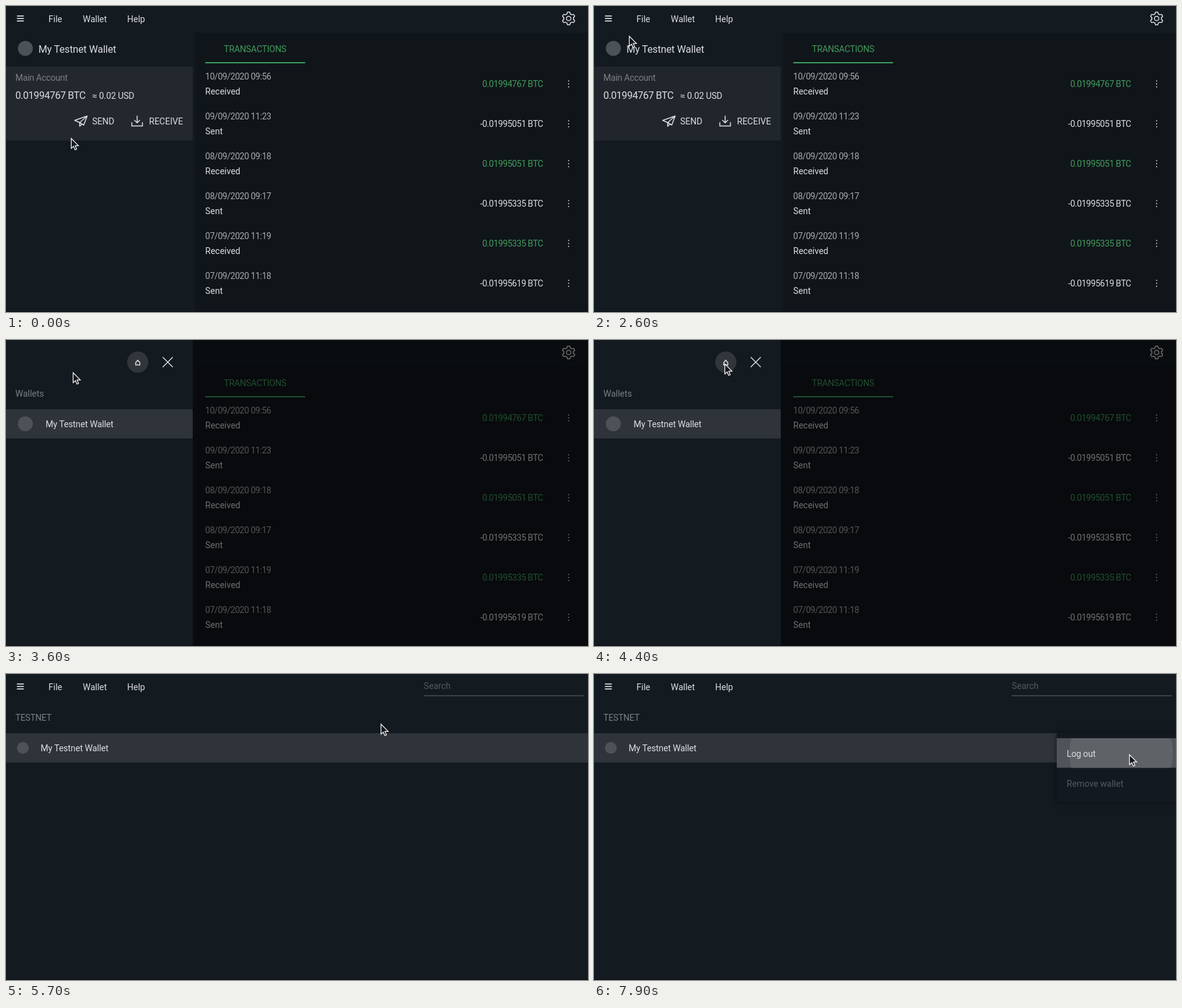
Animation, 932 px wide and 491 px high, one loop 8000 ms. Source, as an HTML page:

```html
<!DOCTYPE html>
<html lang="en">
<head>
<meta charset="utf-8">
<title>Wallet</title>
<style>
  html, body { margin: 0; width: 100%; height: 100%; overflow: hidden; background: #131a20; }
  svg { display: block; width: 100%; height: 100%; }
  text { font: 14px Roboto, "Open Sans", sans-serif; fill: #dcdee0; white-space: pre; }
  .big { font-size: 16px; }
  .name { letter-spacing: -.13px; }
  .num { letter-spacing: -.46px; }
  .tab { letter-spacing: -.22px; }
  .dim { fill: #7b7f83; }
  .date { fill: #a6a9ab; }
  .green { fill: #429c5c; }
  .faint { fill: #54595e; }
  .end { text-anchor: end; }
  .line { fill: none; stroke: #dcdee0; stroke-width: 1.5; }
  .dot { fill: #c4c7c9; }
  .coin { fill: #4c5257; }
</style>
</head>
<body>
<svg id="stage" viewBox="0 0 932 491" preserveAspectRatio="none"></svg>
<script>
const LOOP = 8000, STEP = 100;
const DRAWER_AT = 3000, LIST_AT = 4700, POPUP_AT = 6700;

const text = (x, y, words, cls = '') => `<text x="${x}" y="${y}" class="${cls}">${words}</text>`;
const rect = (x, y, w, h, fill, extra = '') =>
  `<rect x="${x}" y="${y}" width="${w}" height="${h}" fill="${fill}" ${extra}/>`;
const disc = (x, y, r, extra) => `<circle cx="${x}" cy="${y}" r="${r}" ${extra}/>`;
const line = (d, extra = '') => `<path d="${d}" class="line" ${extra}/>`;
const coin = (x, y, r) => disc(x, y, r, 'class="coin"');

// Six-toothed outline: the radius is a clipped cosine of the angle.
function gear(cx, cy) {
  const points = Array.from({ length: 72 }, (_, i) => {
    const a = i * Math.PI / 36;
    const r = 9 - 1.3 * Math.max(-1, Math.min(1, 2.5 * Math.cos(6 * a)));
    return `${(cx + r * Math.cos(a)).toFixed(2)} ${(cy + r * Math.sin(a)).toFixed(2)}`;
  });
  return line(`M${points.join('L')}Z`, 'stroke-linejoin="round"') + disc(cx, cy, 3.6, 'class="line"');
}

const menuBar = [16, 20, 24].map(y => rect(17.5, y - .8, 11, 1.7, '#dcdee0')).join('') +
  text(68, 25.5, 'File') + text(123, 25.5, 'Wallet') + text(194, 25.5, 'Help');

const transactions = [
  ['10/09/2020 09:56', '0.01994767'],
  ['09/09/2020 11:23', '-0.01995051'],
  ['08/09/2020 09:18', '0.01995051'],
  ['08/09/2020 09:17', '-0.01995335'],
  ['07/09/2020 11:19', '0.01995335'],
  ['07/09/2020 11:18', '-0.01995619']
].map(([date, amount], i) => {
  const y = 64 * i, sent = amount[0] === '-';
  return text(319, 118 + y, date, 'num date') +
    text(319, 142 + y, sent ? 'Sent' : 'Received') +
    text(860, 130 + y, amount + ' BTC', 'num end ' + (sent ? '' : 'green')) +
    [-4.7, 0, 4.7].map(d => disc(901, 125 + d + y, 1, 'class="dot"')).join('');
}).join('');

const walletPage = `
  ${rect(303, 43, 629, 448, '#10151a')}
  ${disc(23, 20, 17, 'id="burger" fill="#3a3f43"')}
  ${menuBar}${gear(901, 20)}
  ${coin(31, 68, 12)}${text(52, 74.5, 'My Testnet Wallet', 'big name')}
  ${rect(0, 97, 299, 119, '#20262b')}
  ${rect(0, 97, 299, 119, '#252b30', 'id="panelHover"')}
  ${text(15, 120, 'Main Account', 'dim tab')}
  ${text(15, 149, '0.01994767 BTC', 'big num')}${text(138, 148.5, '≈ 0.02 USD', 'name')}
  ${line('M110 183.5 130 176.5 124.5 191 118 187ZM118 187 130 176.5M118 187V193L121.5 189.5', 'stroke-linejoin="round"')}
  ${text(138, 190, 'SEND')}
  ${line('M210 176V187.5M205.5 183 210 187.5 214.5 183M201.5 186.5V192.5H218.5V186.5')}
  ${text(229, 190, 'RECEIVE')}
  ${text(349, 73.5, 'TRANSACTIONS', 'tab green')}
  ${rect(319, 90, 160, 2, '#3d9c5e')}
  ${transactions}`;

const drawer = `<g id="drawer">
  ${rect(-20, 0, 319, 491, '#131a20')}
  ${disc(211, 35.5, 17, 'fill="#31363a"')}
  ${disc(259, 35.5, 17, 'id="closeFocus" fill="#31363a"')}
  ${line('M207.7 36.2 211 32.5 214.3 36.2V40H207.7Z')}
  ${line('M251 27.5 267 43.5M267 27.5 251 43.5')}
  ${text(15, 91, 'Wallets', 'dim')}
  ${rect(-20, 111, 319, 47, '#2f333a')}
  ${coin(31, 134.5, 12)}${text(63.5, 140, 'My Testnet Wallet', 'name')}
</g>`;

const listPage = `<g id="listPage">
  ${rect(0, 0, 932, 491, '#131a20')}
  ${rect(178, 0, 61, 41, '#393e42', 'id="helpHover"')}
  ${menuBar}
  ${text(669, 24, 'Search', 'faint')}${rect(669, 34, 256, 1.7, '#44494e')}
  ${text(15, 75, 'TESTNET', 'dim tab')}
  ${rect(0, 95, 932, 47, '#2f333a')}${rect(0, 95, 932, 47, '#464b4d', 'id="rowHover"')}
  ${coin(27, 118.5, 9.5)}${text(55.5, 124, 'My Testnet Wallet', 'name')}
  <g id="popup">
    ${rect(741, 94, 210, 112, '#000', 'rx="4" opacity=".5" filter="url(#blur)"')}
    ${rect(741, 94, 210, 112, '#131920', 'rx="4"')}
    ${rect(741, 103, 191, 47.5, '#3d424a')}
    <g clip-path="url(#item)">
      ${rect(741, 103, 191, 47.5, '#fff', 'id="itemFlash"')}
      ${disc(844, 127, 1, 'id="ripple" fill="#5f6367"')}
    </g>
    ${text(757, 132.5, 'Log out', 'name')}${text(757, 180.5, 'Remove wallet', 'faint')}
  </g>
</g>`;

document.getElementById('stage').innerHTML = `<defs>
  <filter id="blur" x="-20%" y="-20%" width="140%" height="140%"><feGaussianBlur stdDeviation="4"/></filter>
  <clipPath id="item">${rect(741, 103, 191, 47.5, '#000')}</clipPath>
</defs>
${rect(0, 0, 932, 491, '#131a20')}
${walletPage}${rect(0, 0, 932, 491, '#000', 'id="shade"')}${drawer}${listPage}
${rect(0, 490, 932, 1, '#090c0f')}
<path id="cursor" d="M.5 .5V16.5L4.2 13.2 6.6 18.8 9.2 17.7 6.9 12.2H12Z" fill="#14171a" stroke="#fff" stroke-width="1.2"/>`;

const ramp = (t, from, to) => Math.max(0, Math.min(1, (t - from) / (to - from)));
const smooth = k => k * k * (3 - 2 * k);

const origin = { x: 104, y: 212 };
const moves = [
  { from: 1000, to: 1500, x: 74, y: 75 },
  { from: 2300, to: 2400, x: 68, y: 60 },
  { from: 2500, to: 2800, x: 22, y: 13 },
  { from: 3300, to: 4000, x: 238, y: 112 },
  { from: 4000, to: 4400, x: 209, y: 38 },
  { from: 5200, to: 6100, x: 879, y: 110 },
  { from: 6200, to: 6500, x: 879, y: 118 },
  { from: 7100, to: 7300, x: 857, y: 129 }
];

function cursorAt(t) {
  return moves.reduce((p, m) => {
    const k = smooth(ramp(t, m.from, m.to));
    return { x: p.x + (m.x - p.x) * k, y: p.y + (m.y - p.y) * k };
  }, origin);
}

const el = id => document.getElementById(id);
const set = (id, attribute, value) => el(id).setAttribute(attribute, value);
const fade = (id, value) => set(id, 'opacity', value);
const show = (id, visible) => { el(id).style.display = visible ? '' : 'none'; };

function draw(t) {
  const drawerOpen = t >= DRAWER_AT && t < LIST_AT;
  show('drawer', drawerOpen);
  show('shade', drawerOpen);
  show('listPage', t >= LIST_AT);
  show('popup', t >= POPUP_AT);

  fade('panelHover', t < 1000 ? .5 - .5 * ramp(t, 0, 200) : ramp(t, 1000, 1200) - ramp(t, 1500, 1700));
  fade('burger', ramp(t, 2600, 2800));
  fade('shade', .42 + .08 * ramp(t, DRAWER_AT, 3200));
  fade('closeFocus', 1 - ramp(t, DRAWER_AT, 3400));
  fade('helpHover', 1 - ramp(t, 5200, 5400));
  fade('rowHover', ramp(t, 5800, 6000) - ramp(t, POPUP_AT, 7000));

  const press = ramp(t, 7600, 7900);
  fade('itemFlash', .09 * press);
  set('ripple', 'r', 83 * press);
  set('drawer', 'transform', `translate(${-17 * (1 - ramp(t, DRAWER_AT, 3300)) ** 2} 0)`);

  const { x, y } = cursorAt(t);
  set('cursor', 'transform', `translate(${Math.round(x)} ${Math.round(y)})`);
}

const start = performance.now();
function tick() {
  const t = (performance.now() - start) % LOOP;
  draw(Math.floor(t / STEP) * STEP);
  requestAnimationFrame(tick);
}
tick();
</script>
</body>
</html>
```
